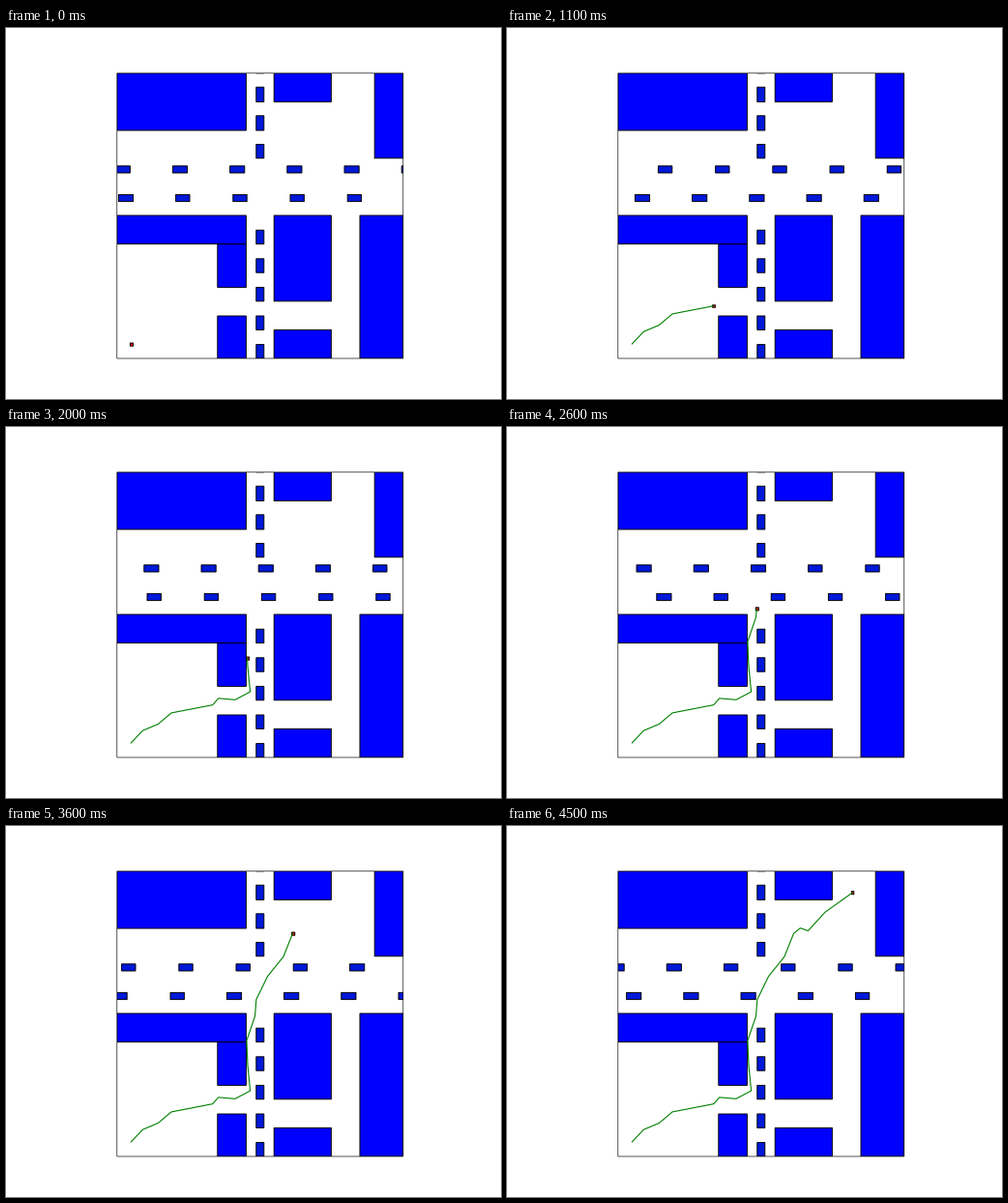
Animation of 512 by 384 pixels, one loop 4.6 s. Source, as a matplotlib script:

```python
from math import dist, floor

import matplotlib.pyplot as plt
import numpy as np
from matplotlib.animation import FuncAnimation
from matplotlib.patches import Rectangle

WIDTH, HEIGHT = 640, 480
SIZE = 20                          # the map is SIZE x SIZE units
UNIT = 18.48                       # canvas units per map unit
LEFT, BASE = 143.2, 427.2          # lower left corner of the map
GAP = 4                            # distance between cars in a lane
SPEED = 0.1                        # distance a car drives per frame
STEP = 0.6                         # distance the robot walks per frame
CAR_BLUE = "#0018d8"

# blocks by column: (left, right) -> (bottom, top) of each building
BLOCKS = {
    (0, 9): [(8, 10), (16, 20)],
    (7, 9): [(0, 3), (5, 8)],
    (11, 15): [(0, 2), (4, 10), (18, 20)],
    (17, 20): [(0, 10)],
    (18, 20): [(14, 20)],
}

# turning points of the robot
TURNS = [
    (1, 1), (1.81, 1.86), (2.9, 2.32), (3.82, 3.1), (6.71, 3.66),
    (7.11, 4.12), (8.28, 4.02), (9.34, 4.58), (9.16, 6.36), (9.09, 8.1),
    (9.67, 9.8), (9.76, 10.97), (10.55, 12.59), (11.66, 13.97), (12.31, 15.6),
    (12.77, 15.97), (13.32, 15.78), (14.5, 17.08), (16.42, 18.45),
]


def walk(turns):
    """Split every leg into equal strides of about one STEP."""
    path = [turns[0]]
    for a, b in zip(turns, turns[1:]):
        strides = round(dist(a, b) / STEP)
        path.extend(np.linspace(a, b, strides + 1)[1:])
    return np.array(path)


def snap(v):
    return floor(v + 0.5) + 0.5


def bounds(x, y, w, h):
    """Map rectangle to canvas bounds, with its edges on whole canvas units."""
    x0, x1 = snap(LEFT + UNIT * x), snap(LEFT + UNIT * (x + w))
    y0, y1 = snap(BASE - UNIT * (y + h)), snap(BASE - UNIT * y)
    return x0, y0, x1 - x0, y1 - y0


fig = plt.figure(figsize=(6.4, 4.8), dpi=80)
ax = fig.add_axes([0, 0, 1, 1])
ax.set(xlim=(0, WIDTH), ylim=(HEIGHT, 0))
ax.axis("off")


def box(x, y, w, h, color, linewidth=0.85, **style):
    x, y, w, h = bounds(x, y, w, h)
    patch = Rectangle((x, y), w, h, facecolor=color, edgecolor="black",
                      linewidth=linewidth, snap=False, **style)
    return ax.add_patch(patch)


frame = box(0, 0, SIZE, SIZE, "none", linewidth=0.6, zorder=3)


def thing(*args):
    patch = box(*args)
    patch.set_clip_path(frame)
    return patch


for (x0, x1), column in BLOCKS.items():
    for y0, y1 in column:
        thing(x0, y0, x1 - x0, y1 - y0, "blue")

# standing traffic on the vertical road, clear of the crossing
for y in range(0, SIZE + 1, 2):
    if not 10 <= y <= 12:
        thing(9.75, y, 0.5, 1, CAR_BLUE)

slots = range(-GAP, SIZE + GAP, GAP)
west = [thing(x, 13, 1, 0.5, CAR_BLUE) for x in slots]
east = [thing(x, 11, 1, 0.5, CAR_BLUE) for x in slots]
robot = thing(0.9, 0.9, 0.2, 0.2, "red")
trail, = ax.plot([], [], color="green", linewidth=1)
path = walk(TURNS)


def draw(i):
    shift = SPEED * (i + 1) % GAP
    for slot, left, right in zip(slots, west, east):
        left.set_bounds(*bounds(slot + GAP - shift, 13, 1, 0.5))
        right.set_bounds(*bounds(slot + shift, 11, 1, 0.5))
    x, y = path[i]
    robot.set_bounds(*bounds(x - 0.1, y - 0.1, 0.2, 0.2))
    trail.set_data(LEFT + UNIT * path[:i + 1, 0], BASE - UNIT * path[:i + 1, 1])
    return [*west, *east, robot, trail]


anim = FuncAnimation(fig, draw, frames=len(path), interval=100, repeat=True)
plt.show()
```
